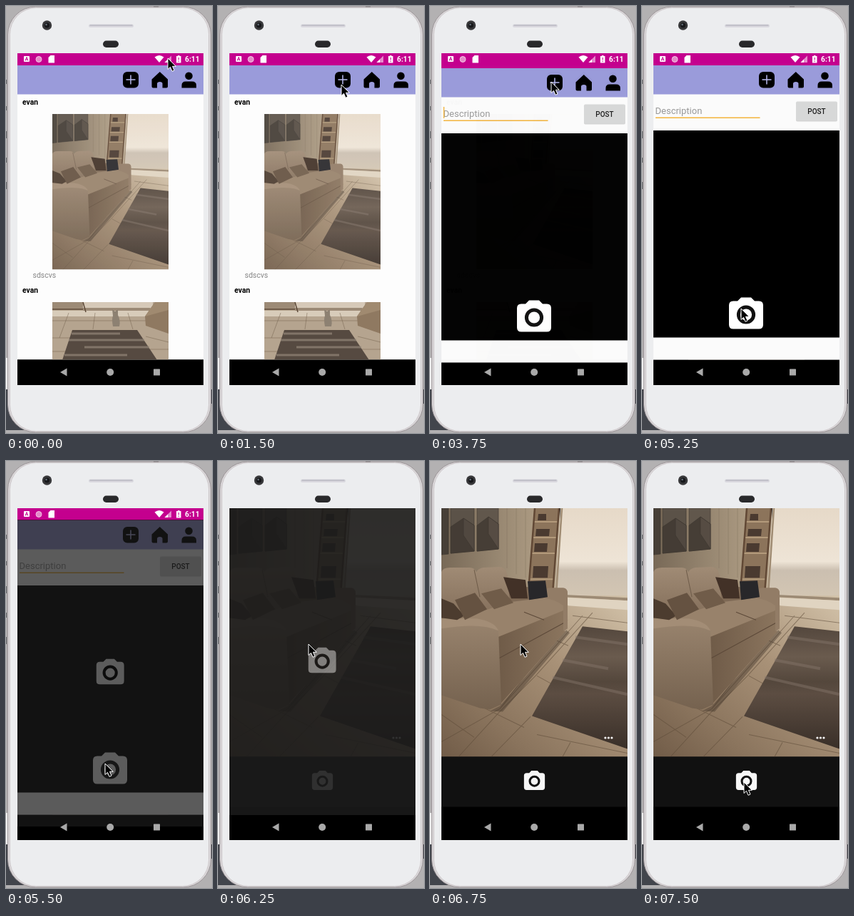
An HTML page for the animation above (8 s loop, 289 by 597 pixels).

```html
<!DOCTYPE html>
<html lang="en">
<head>
<meta charset="utf-8">
<title>Photo post on a phone</title>
<style>
  html, body { margin: 0; width: 100%; height: 100%; overflow: hidden; background: #b3b1b2; }
  svg { display: block; }
  body > svg { width: 100vw; height: 100vh; }
  text { font-family: Roboto, "Liberation Sans", sans-serif; }
  .name { font-weight: 700; font-size: 10.3px; }
  .post, .camera, .splash, .caret, .cursor { animation: 8s step-end infinite; }
  .post { animation-name: post; }
  .camera { animation-name: camera; }
  .splash { animation-name: splash; }
  .caret { animation-name: caret; }
  .cursor { animation-name: cursor; }

  @keyframes post {
    0% { visibility: hidden; }
    46.875% { visibility: visible; opacity: .985; transform: translateY(4px); }
    50%, 100% { visibility: visible; opacity: 1; transform: none; }
  }
  @keyframes caret {
    0%, 53.125%, 65.625%, 100% { opacity: 0; }
    46.875%, 59.375% { opacity: 1; }
  }
  @keyframes splash {
    0% { opacity: 0; transform: none; }
    68.75% { opacity: .71; transform: translateY(16px); }
    71.875% { opacity: 1; transform: none; }
    78.125% { opacity: .9; }
    81.25% { opacity: .68; }
    84.375%, 100% { opacity: 0; }
  }
  @keyframes camera {
    0% { visibility: hidden; }
    78.125%, 100% { visibility: visible; }
  }
  @keyframes cursor {
    0% { transform: translate(227px, 73px); }
    3.125% { transform: translate(161px, 121px); }
    9.375% { transform: translate(166px, 115px); }
    12.5% { transform: translate(165px, 113px); }
    15.625% { transform: translate(173px, 110px); }
    40.625% { transform: translate(169px, 105px); }
    43.75% { transform: translate(170px, 106px); }
    53.125% { transform: translate(68px, 313px); }
    56.25% { transform: translate(52px, 262px); }
    59.375% { transform: translate(155px, 390px); }
    62.5% { transform: translate(143px, 420px); }
    65.625% { transform: translate(139px, 423px); }
    75% { transform: translate(127px, 256px); }
    87.5% { transform: translate(132px, 380px); }
    90.625% { transform: translate(131px, 417px); }
    93.75%, 100% { transform: translate(143px, 449px); }
  }
</style>
</head>
<body>
<svg viewBox="0 0 289 597" preserveAspectRatio="none">
  <defs>
    <linearGradient id="wall">
      <stop offset="0" stop-color="#786957"/><stop offset="1" stop-color="#b9a78d"/>
    </linearGradient>
    <linearGradient id="window" x2="0" y2="1">
      <stop offset="0" stop-color="#e6d9c8"/><stop offset=".6" stop-color="#eee4d6"/>
      <stop offset=".7" stop-color="#cbbfb0"/><stop offset="1" stop-color="#d3c6b3"/>
    </linearGradient>
    <linearGradient id="floor" x1="1" y1="0" x2="0" y2="1">
      <stop offset="0" stop-color="#d3c3aa"/><stop offset=".4" stop-color="#a89177"/>
      <stop offset=".75" stop-color="#8a745d"/><stop offset="1" stop-color="#715c48"/>
    </linearGradient>
    <linearGradient id="rug" x2="0" y2="1">
      <stop offset="0" stop-color="#54473d"/><stop offset=".25" stop-color="#6a5b4e"/>
      <stop offset=".45" stop-color="#54473c"/><stop offset=".55" stop-color="#5c4d42"/>
      <stop offset="1" stop-color="#392f28"/>
    </linearGradient>
    <linearGradient id="arm" x2="0" y2="1">
      <stop offset="0" stop-color="#99846e"/><stop offset="1" stop-color="#75624f"/>
    </linearGradient>
    <linearGradient id="back" x2="0" y2="1">
      <stop offset="0" stop-color="#a08b75"/><stop offset="1" stop-color="#826d59"/>
    </linearGradient>
    <linearGradient id="base">
      <stop offset="0" stop-color="#6f5b48"/><stop offset="1" stop-color="#8b755e"/>
    </linearGradient>

    <symbol id="room" viewBox="16 66 261 347" preserveAspectRatio="none">
      <path fill="url(#wall)" d="M16 66H182V220H16z"/>
      <path stroke="#6d5e4e" stroke-opacity=".3" d="M108 66V150M121 66V158M134 66V163"/>
      <g stroke="#3d3630" stroke-width=".6">
        <path fill="#473f37" d="M16 66H26V130L16 131z"/>
        <path fill="#5b5248" d="M29 66H62V126L29 129z"/>
        <path fill="#443c35" d="M29 92L47 80 62 90V126L29 129z"/>
        <path fill="#514840" d="M47 80L62 90V126L47 104z"/>
        <path fill="#61574c" d="M66 66H96V123L66 126z"/>
        <path fill="#463e36" d="M66 90L82 78 96 88V123L66 126z"/>
        <path fill="#564c43" d="M82 78L96 88V123L82 102z"/>
      </g>
      <path fill="#8c745b" d="M147 66H181L172 186H139z"/>
      <path fill="#4a3a30" d="M152 74h11v9h-12zM149 95h19l-1 10h-19zM147 115h18l-1 12h-18zM145 147h21l-1 16h-21z"/>
      <path fill="none" stroke="#b39a7b" stroke-width="2" d="M145 85H179M144 107H177M142 129H175M140 165H173"/>
      <path fill="none" stroke="#614835" stroke-width="2.500" d="M147 66L139 170M181 66L172 186"/>
      <path fill="url(#window)" d="M183 66H277V190H175z"/>
      <path fill="none" stroke="#a08c73" stroke-width="2.500" d="M185 66L177 186"/>
      <path fill="url(#floor)" d="M172 188H277V413H16V300z"/>
      <path fill="#9c8a74" d="M174 186L277 191V195L174 189z"/>
      <path fill="#e0d4c1" d="M180 190L277 195V208L194 202z"/>
      <path fill="none" stroke="#5c4938" stroke-opacity=".55" d="M214 216L98 346 16 392M228 212L148 300 96 352 40 413M141 357L86 413M193 222L98 346M16 354L62 386M76 345L132 372M150 382L277 408M197 393L186 413M176 250L194 258M200 216L277 226M150 300L172 312"/>
      <path fill="url(#rug)" d="M214 231L277 238V402L143 356z"/>
      <path fill="none" stroke="#86776a" stroke-opacity=".45" stroke-width="4" d="M204 246L277 256M186 278L250 290M172 302L277 326"/>
      <path fill="#3d3027" opacity=".4" d="M98 342L191 236 196 240 102 350 84 349z"/>
      <path fill="url(#back)" d="M16 155Q18 149 28 149H56Q62 149 65 155Q68 150 75 149L99 148Q106 149 109 160L116 200 60 222H16z"/>
      <path fill="none" stroke="#6e5c4a" d="M62 152L70 190"/>
      <path fill="#7e6955" d="M110 173L166 179V192L112 200z"/>
      <path fill="#98826b" d="M42 220L112 197 168 190 190 198 187 211 97 250 72 225z"/>
      <path fill="url(#base)" d="M95 246L189 208V239L98 340z"/>
      <path fill="none" stroke="#5c4939" d="M96 276L188 226M132 211L160 222"/>
      <path fill="#927c66" d="M161 182Q162 177 170 177H187Q193 178 193 184V234L187 238V202Q176 193 161 192z"/>
      <path fill="url(#arm)" d="M16 220H65Q91 224 96 237L100 340 84 347 70 345 16 327z"/>
      <path fill="#a38d76" d="M16 220H65Q91 224 96 237 72 225 16 234z"/>
      <path fill="#4c3c2f" d="M16 192L33 199 48 216 38 222 16 219z"/>
      <path fill="#655241" d="M35 194L63 184 80 207 49 222z"/>
      <path fill="#705c49" d="M72 185L100 178 117 198 90 207z"/>
      <path fill="#423127" d="M103 162L134 166 137 192 114 192z"/>
      <path fill="#28272a" d="M137 168L162 167 165 190 139 194z"/>
    </symbol>

    <!-- Camera glyph centred on 0,0 -->
    <g id="cam">
      <path fill="currentColor" d="M-18 -17H-12L-7 -22H7L12 -17H18Q24 -17 24 -11V16Q24 22 18 22H-18Q-24 22 -24 16V-11Q-24 -17 -18 -17z"/>
      <circle cy="2" r="10.600" fill="none" stroke="#111" stroke-width="5"/>
    </g>

    <g id="actions">
      <path fill="#9a9bda" d="M16 83H277V123.500H16z"/>
      <rect x="164" y="92" width="22" height="22.500" rx="6"/>
      <path stroke="#b9baf0" stroke-width="1.500" d="M175 96.500V109.500M168.500 103H181.500"/>
      <path d="M215.800 92L227 102.500V112.500Q227 114.500 225 114.500H219.500V108.500Q219.500 106 215.800 106T212 108.500V114.500H206.500Q204.500 114.500 204.500 112.500V102.500z"/>
      <circle cx="256.500" cy="97.700" r="5.300"/>
      <path d="M246.500 114.500V111Q246.500 105.500 252 105.500H261Q267 105.500 267 111V114.500z"/>
    </g>
    <clipPath id="screen"><path d="M16 66H277V530H16z"/></clipPath>
  </defs>

  <!-- Backdrop and phone -->
  <path fill="#b3b1b2" d="M0 0H289V597H0z"/>
  <path fill="#f2f2f2" d="M0 492H3V536H0z"/>
  <path fill="#42454c" d="M0 536H60V593H0zM286 536H289V556H286z"/>
  <path stroke="#55565a" d="M.5 103v6M.5 140v6M.5 175v10M.5 212v7M.5 246v10"/>
  <rect x="2.500" y="1" width="285" height="595" rx="39" fill="#d9d6d8" stroke="#9c9598"/>
  <rect x="5.500" y="2.500" width="279" height="592" rx="37" fill="#ecedef" stroke="#c9c3c6" stroke-width=".8"/>
  <path fill="#8d888b" d="M207 0h7v1.500h-7z"/>
  <circle cx="57.500" cy="27" r="6.700" fill="#38383a"/>
  <circle cx="57.500" cy="27" r="3.600" fill="#17181b"/>
  <circle cx="56.500" cy="26" r="1.200" fill="#6d7580"/>
  <rect x="116" y="25.500" width="63" height="4.500" rx="2.200" fill="#d9d8de"/>
  <path stroke="#a9a8b4" d="M117.500 27H177.500"/>
  <rect x="136" y="48.500" width="22" height="9.500" rx="4.700" fill="#29292b"/>

  <g clip-path="url(#screen)">
    <path d="M16 494H277V530H16z"/>
    <!-- Feed -->
    <path fill="#fdfdfd" d="M16 123H277V494.300H16z"/>
    <use href="#actions"/>
    <text class="name" x="23" y="138">evan</text>
    <use href="#room" x="65" y="151" width="163" height="217.500"/>
    <path fill="#fff" opacity=".07" d="M65 151H228V368.500H65z"/>
    <text x="37.500" y="380" font-size="10.500" fill="#858585">sdscvs</text>
    <text class="name" x="23" y="401">evan</text>
    <svg x="65" y="414" width="163" height="80.300" viewBox="65 414 163 80.300">
      <path fill="#b5a48f" d="M65 414H228V495H65z"/>
      <path fill="#d6c9b8" d="M108 414H206V422H108z"/>
      <path fill="#9c8a76" d="M65 414H108V424H65zM108 422H202V426H108z"/>
      <path fill="#d8ccba" d="M65 426H200V434H65z"/>
      <path fill="none" stroke="#5d4938" stroke-width="1.500" d="M108 414L112 428M65 424H108"/>
      <path fill="none" stroke="#74624f" stroke-opacity=".5" d="M65 440H200M65 464H90M196 462L228 470M65 483H84M125 429L122 452M88 429L75 464M171 429L178 452M202 480H228"/>
      <path fill="#8f7961" d="M195 434L209 414H228V458L196 447z"/>
      <path fill="#a08a70" d="M195 434L209 414H228V425z"/>
      <path fill="#564a41" d="M93 453H184L212 495H79z"/>
      <path fill="none" stroke="#93867a" stroke-opacity=".7" stroke-width="3" d="M92 458H160M88 467H194M110 477H201M82 488H170"/>
      <path fill="#8d8172" d="M150 448Q148 438 150 433L149 424 153 427 157 424V432Q161 440 159 448z"/>
    </svg>

    <!-- New post -->
    <g class="post">
      <path fill="#c4008e" d="M16 78H277V84H16z"/>
      <path fill="#fbfbfb" d="M16 123H277V494.500H16z"/>
      <use href="#actions"/>
      <text x="18.500" y="151" font-size="13" fill="#999">Description</text>
      <path stroke="#f3b43c" stroke-width="1.500" d="M19 156.300H165.500"/>
      <path class="caret" stroke="#f3b43c" stroke-width="1.400" d="M19.500 137V153"/>
      <rect x="216" y="134.500" width="58" height="27" rx="2" fill="#bbb" opacity=".6"/>
      <rect x="216" y="133.500" width="58" height="26.500" rx="2" fill="#d7d8d8"/>
      <text x="245" y="151" text-anchor="middle" font-size="10" font-weight="500" fill="#1d1d1d">POST</text>
      <path d="M16 174H277V463.500H16z"/>
      <use href="#cam" x="146" y="429.500" color="#fff"/>
    </g>

    <!-- Status bar -->
    <path fill="#c4008e" d="M16 66H277V83H16z"/>
    <g fill="#fff">
      <rect x="25" y="70" width="8" height="8" rx="1"/>
      <path fill="none" stroke="#c4008e" d="M27 76.500L29 71.500 31 76.500M27.800 75H30.200"/>
      <circle cx="46" cy="74.500" r="4" fill="#e48bc9" stroke="#f3c5e4"/>
      <path d="M62.500 69H68V79.500H59.500V72z"/>
      <path d="M208.500 71.500Q215 66.500 221.500 71.500L215 79z"/>
      <path opacity=".55" d="M232 69.500V79H222.500z"/>
      <path d="M222.500 79L227 74.500V79z"/>
      <path d="M241 69H243.500V70H245.500V79.500H239V70H241z"/>
      <path stroke="#c4008e" d="M242.300 72V75.500M242.300 76.700V78"/>
      <text x="251" y="78.300" font-size="10.300" font-weight="700">6:11</text>
    </g>

    <!-- Camera -->
    <g class="camera">
      <path fill="#111" d="M16 66H277V484H16z"/>
      <path d="M16 483.500H277V530H16z"/>
      <use href="#room" x="16" y="66" width="261" height="347.500"/>
      <g fill="#fff">
        <circle cx="246" cy="387" r="1.600"/><circle cx="250.500" cy="387" r="1.600"/><circle cx="255" cy="387" r="1.600"/>
      </g>
      <use href="#cam" color="#f7f7f7" transform="translate(146.500 446.500) scale(.61)"/>
    </g>

    <!-- Launch splash -->
    <g class="splash">
      <path fill="#1a1a1a" d="M16 66H277V495H16z"/>
      <use href="#cam" color="#828282" transform="translate(146.200 278.500) scale(.81)"/>
    </g>

    <g fill="#a9a9a9">
      <path d="M76 512L85.500 506.500V517.500z"/>
      <circle cx="146.200" cy="512" r="5"/>
      <rect x="207" y="507.500" width="9" height="9" rx=".6"/>
    </g>
  </g>

  <path class="cursor" stroke="#fff" stroke-width="1" d="M0 0V15.500L3.500 12.300 6 18.300 9 17 6.500 11.300H11.300z"/>
</svg>
</body>
</html>
```
